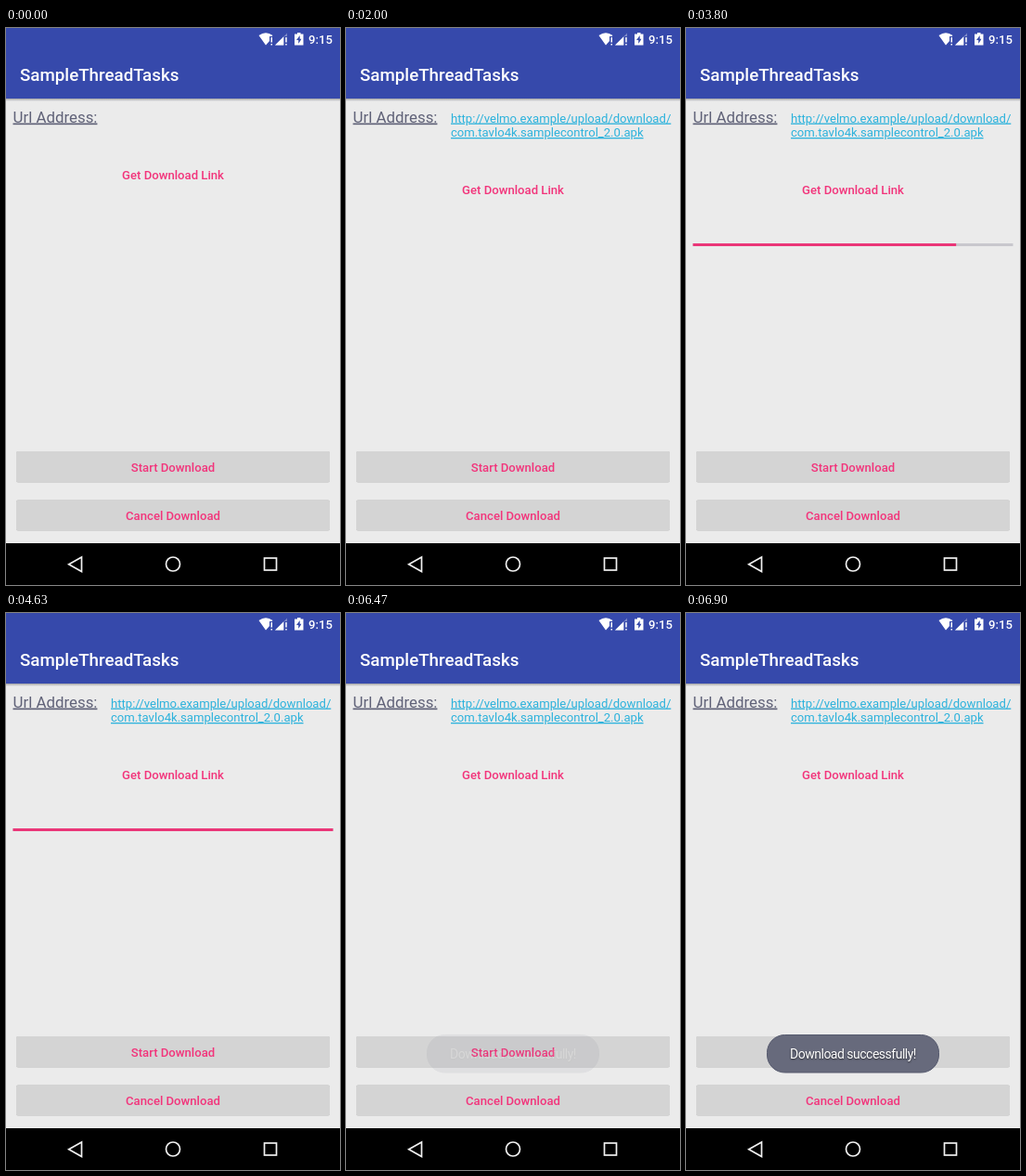
An HTML page that plays this animation: 360 by 600 pixels, repeating every 7.9 s.

```html
<!DOCTYPE html>
<html lang="en">
<head>
<meta charset="utf-8">
<title>Download demo</title>
<style>
  html, body { margin: 0; width: 100%; height: 100%; overflow: hidden; }
  svg { display: block; width: 360px; height: 600px; }
  text { font: 13.125px Roboto, sans-serif; }
  .medium { font-weight: 500; }
  .title { font-size: 18.75px; }
  .label { font-size: 16.875px; fill: #606278; }
  .link { fill: #2cb2dc; }
  .label, .link { text-decoration: underline; text-decoration-skip-ink: none; }
  .action { fill: #f2347b; text-anchor: middle; }
  .button { fill: #d4d4d4; filter: drop-shadow(0 .7px .5px #0003); }
  .toast { font-size: 14px; letter-spacing: -.5px; text-anchor: middle; fill: #fff; text-shadow: 0 1px 2px #000a; }
</style>
</head>
<body>
<svg viewBox="0 0 360 600">
  <defs>
    <linearGradient id="shade" x2="0" y2="1">
      <stop stop-color="#000" stop-opacity=".3"/>
      <stop offset="1" stop-color="#000" stop-opacity="0"/>
    </linearGradient>
    <path id="bang" d="M0 0h1.500v5.500h-1.500zM0 7h1.500v1.500h-1.500z"/>
  </defs>
  <rect width="360" height="600" fill="#ebebeb"/>
  <rect width="360" height="76" fill="#3649ab"/>
  <rect y="76" width="360" height="3" fill="url(#shade)"/>

  <g fill="#fff">
    <path d="M272.500 8Q280 2.500 287.500 8L286.500 9H284V14L280 18.500Z"/>
    <use href="#bang" x="285.500" y="10"/>
    <path d="M290 18.500L303 5.500V9H300V18.500Z" opacity=".35"/>
    <path d="M290 18.500L299 9.500V18.500Z"/>
    <use href="#bang" x="301.200" y="10"/>
    <path d="M311 6.500h3V5h3.500v1.500h3V18.500h-9.500Z"/>
    <path d="M316.700 8L313 13H315.200V17L318.500 11.800H316.700Z" fill="#3649ab"/>
    <text class="medium" x="326" y="17">9:15</text>
    <text class="medium title" x="15" y="57">SampleThreadTasks</text>
  </g>

  <text class="label" x="7.500" y="101.500">Url Address:</text>
  <g id="link">
    <text class="link" x="113" y="101.500">http://velmo.example/upload/download/</text>
    <text class="link" x="113" y="117">com.tavlo4k.samplecontrol_2.0.apk</text>
  </g>
  <text class="action medium" id="getLink" x="180" y="163">Get Download Link</text>

  <g id="progress">
    <rect x="7.500" y="232" width="345" height="3" fill="#c8c7cd"/>
    <rect id="bar" x="7.500" y="232" height="3" fill="#ea3678"/>
  </g>

  <rect class="button" x="11" y="456" width="338" height="33.500" rx="2"/>
  <text class="action medium" x="180" y="477.500">Start Download</text>
  <rect class="button" x="11" y="508.500" width="338" height="33" rx="2"/>
  <text class="action medium" x="180" y="530">Cancel Download</text>

  <g id="toast">
    <rect x="87.500" y="454.500" width="185" height="40.500" rx="19" fill="#676a7c" stroke="#565a6e"/>
    <text class="toast" x="180" y="480">Download successfully!</text>
  </g>

  <rect y="555" width="360" height="45" fill="#000"/>
  <g fill="none" stroke="#f0f0f0" stroke-width="1.700">
    <path d="M81.500 570V585.500L67.700 577.700Z"/>
    <circle cx="180" cy="577.500" r="7.500"/>
    <rect x="278.500" y="571" width="13" height="13"/>
  </g>
</svg>
<script>
  const LOOP = 7900, LINK_AT = 1000, START = 2030, DONE = 6470, TOAST_FULL = 6900;
  const progressKeys = [[START, 0], [2770, 0.571], [3800, 0.822], [4600, 1]];
  const [link, getLink, progress, bar, toast] =
    ['link', 'getLink', 'progress', 'bar', 'toast'].map(id => document.getElementById(id));

  const ramp = (t, a, b) => Math.min(1, Math.max(0, (t - a) / (b - a)));
  const show = (el, on) => el.setAttribute('visibility', on ? 'visible' : 'hidden');

  function progressAt(t) {
    return progressKeys.slice(1).reduce((sum, [end, value], i) => {
      const [start, from] = progressKeys[i];
      return sum + (value - from) * ramp(t, start, end);
    }, 0);
  }

  function draw(now) {
    const t = now % LOOP;
    show(link, t >= LINK_AT);
    getLink.setAttribute('y', t < LINK_AT ? 163 : 178.5);
    show(progress, t >= START && t < DONE);
    bar.setAttribute('width', 345 * progressAt(t));
    show(toast, t >= DONE);
    toast.setAttribute('opacity', 0.08 + 0.92 * ramp(t, DONE, TOAST_FULL));
    requestAnimationFrame(draw);
  }
  draw(0);
</script>
</body>
</html>
```
